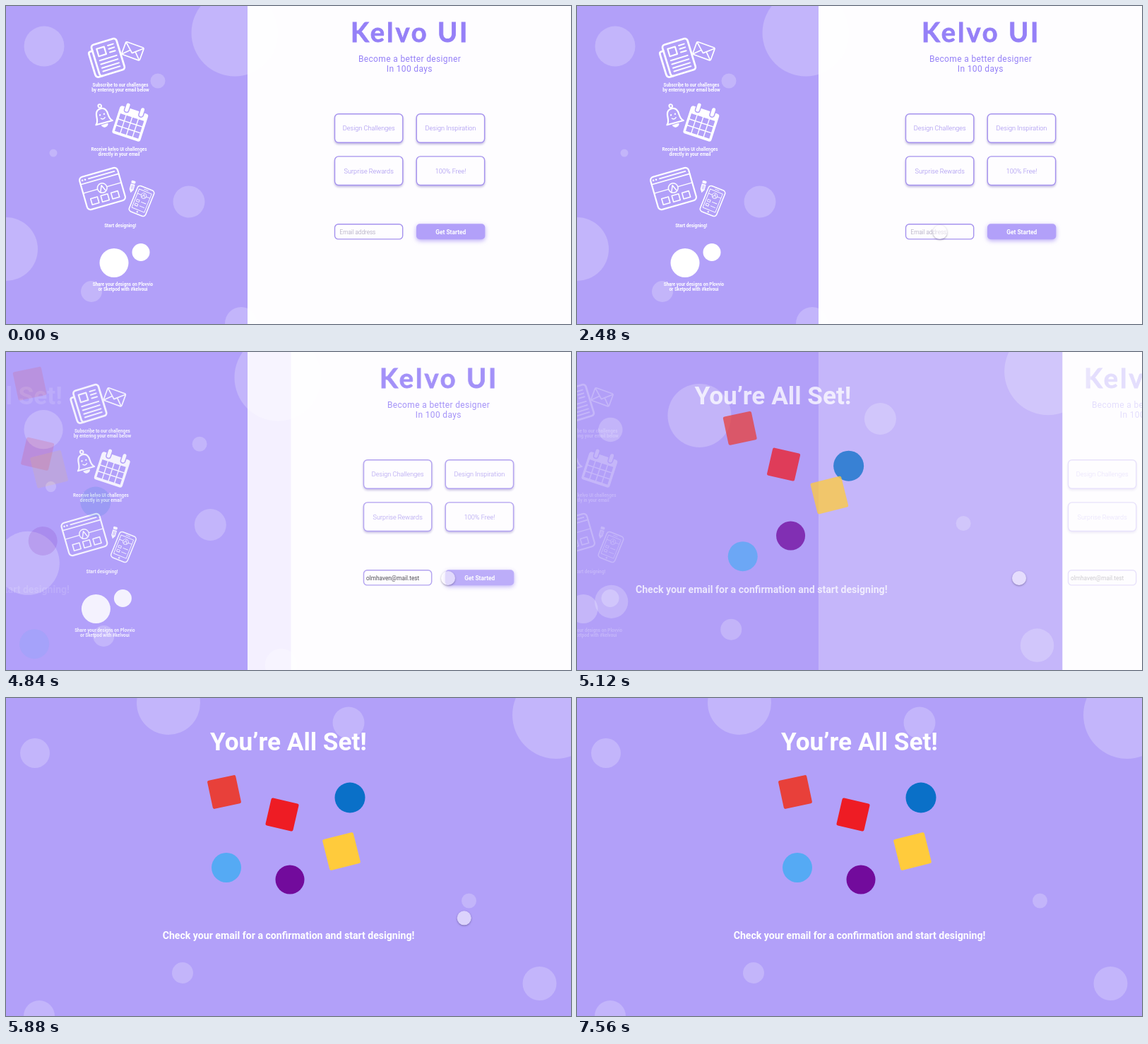
An HTML page that plays this animation: 800 px wide and 450 px high, repeating every 7.6 s.

```html
<!DOCTYPE html>
<html lang="en">
<head>
<meta charset="utf-8">
<title>Design challenge sign-up</title>
<style>
/* p: page change, a: cursor entry, h: cursor slide, b: cursor exit, n: typed letters */
@property --p { syntax: "<number>"; inherits: true; initial-value: 0; }
@property --a { syntax: "<number>"; inherits: true; initial-value: 0; }
@property --h { syntax: "<number>"; inherits: true; initial-value: 0; }
@property --b { syntax: "<number>"; inherits: true; initial-value: 0; }
@property --n { syntax: "<integer>"; inherits: true; initial-value: 0; }

html, body { margin: 0; width: 100%; height: 100%; overflow: hidden; background: #fefdff; }
.stage {
  position: relative; width: 800px; height: 450px; overflow: hidden;
  animation: loop 7.6s linear infinite;
}
@keyframes loop {
  0% { --p: 0; --a: 0; --h: 0; --b: 0; --n: 0; }
  7.37% { --a: 0; animation-timing-function: cubic-bezier(.455, .03, .515, .955); }
  23.68% { --a: 1; }
  33.3% { --n: 0; }
  42.6% { --n: 18; }
  43.16% { --h: 0; animation-timing-function: cubic-bezier(.455, .03, .515, .955); }
  51.58% { --h: 107; }
  54.6% { --h: 107; animation-timing-function: cubic-bezier(.455, .03, .515, .955); }
  59.2% { --h: 112; }
  61.29% { --p: 0; animation-timing-function: cubic-bezier(.455, .03, .515, .955); }
  70.74% { --p: 1; }
  73.1% { --b: 0; animation-timing-function: cubic-bezier(.455, .03, .515, .955); }
  88.45% { --b: 1; }
  100% { --p: 1; --a: 1; --h: 112; --b: 1; --n: 18; }
}

svg { display: block; font-family: Roboto, "Liberation Sans", sans-serif; }
.mid { text-anchor: middle; }
.purple { fill: #b2a0f9; }
.cover { width: calc(342px + 458px * var(--p)); opacity: var(--p); }
.leave { opacity: calc(1 - var(--p)); transform: translateX(calc(var(--dx) * var(--p))); }
.enter { opacity: var(--p); transform: translateX(calc(var(--dx) * (1 - var(--p)))); }
.bubble {
  fill: #fff; fill-opacity: .22;
  cx: calc(1px * (var(--x) + var(--dx) * var(--p)));
  cy: calc(1px * (var(--y) + var(--dy) * var(--p)));
  r: calc(1px * (var(--r) + var(--dr) * var(--p)));
}
.badge {
  opacity: var(--p);
  transform: translate(calc(1px * (var(--x) + var(--dx) * var(--p))),
                       calc(1px * (var(--y) + var(--dy) * var(--p))));
}

.title {
  font: 700 38px Lato, sans-serif; letter-spacing: 3px;
  fill: #9580f7; stroke: #9580f7; stroke-width: .8;
}
.lead { font-size: 12px; letter-spacing: .35px; fill: #9580f7; }
.box { fill: #fefdff; stroke: #a592ee; stroke-width: 1.4; }
.card .box { filter: drop-shadow(0 2px 1.5px rgba(90, 70, 170, .35)); }
.card text { font-size: 9.15px; font-weight: 300; fill: #9d88ee; }
.button { filter: drop-shadow(0 2px 3px rgba(140, 115, 240, .6)); }
.button + text { font-size: 8.4px; font-weight: 700; fill: #fff; }
.hint { font-size: 8.2px; font-weight: 300; fill: #9f97b2; fill-opacity: clamp(0, 1 - var(--n), 1); }
.typed { font-size: 8.25px; fill: #35323c; }
.typed tspan { fill-opacity: clamp(0, var(--n) - var(--i), 1); }

.steps { fill: #fff; }
.steps text { font-size: 6.3px; font-weight: 700; text-anchor: middle; }
.line { fill: none; stroke: #fff; stroke-linecap: round; stroke-linejoin: round; }
.done { font-weight: 700; fill: #fff; text-anchor: middle; }

.cursor {
  position: absolute; left: -10px; top: -10px; width: 20px; height: 20px; border-radius: 50%;
  background: rgba(255, 253, 255, .55);
  box-shadow: 0 1px 2.5px rgba(40, 30, 70, .42);
  transform: translate(
    calc(1px * (770 - 256 * var(--a) * var(--a) + var(--h)
      + 142 * var(--b) * (1 - var(--b)) + 134 * var(--b) * var(--b))),
    calc(1px * (408 * var(--a) * (1 - var(--a)) + 334 * var(--a) * var(--a) - 14
      - 334 * var(--b) * var(--b))));
}
</style>
</head>
<body>
<div class="stage">
<svg width="800" height="450" viewBox="0 0 800 450">
  <rect width="800" height="450" fill="#fefdff"/>
  <rect class="purple" width="342" height="450"/>

  <g class="leave" style="--dx:305px">
    <text class="title" x="488" y="51">Kelvo UI</text>
    <text class="lead mid" x="571.5" y="78.6">Become a better designer</text>
    <text class="lead mid" x="571.3" y="93.2">In 100 days</text>
    <g id="cards"></g>
    <rect class="box" x="465.5" y="308.7" width="96.2" height="21.2" rx="5"/>
    <text class="hint" x="472.5" y="322.8">Email address</text>
    <text class="typed" id="typed" x="469" y="322.8"></text>
    <rect class="purple button" x="581" y="308.3" width="97.3" height="22" rx="5"/>
    <text class="mid" x="629.8" y="322.9">Get Started</text>
  </g>

  <rect class="purple cover" height="450"/>
  <g id="bubbles"></g>

  <g class="steps leave" style="--dx:-191px">
    <!-- newspaper -->
    <g class="line" transform="translate(143 73) rotate(-17)" stroke-width="2.7">
      <rect x="-17" y="-23" width="37" height="46" rx="4"/>
      <path d="M-17 -15h-3q-3 0-3 3v30q0 5 5 5h5"/>
      <rect x="-10.5" y="-16" width="11" height="11" stroke-width="2.2"/>
      <path d="M6 -16h8M6 -11h8M6 -6h8M-11 1h25M-11 6.5h25M-11 12h25M-11 17h25" stroke-width="2"/>
    </g>
    <!-- envelope -->
    <g class="line" transform="translate(179.5 63.8) rotate(20)" stroke-width="1.7">
      <rect x="-13.5" y="-9.5" width="27" height="19" rx="2"/>
      <path d="M-13 -8.5L0 3L13 -8.5M-12.5 8.5L-4 0M12.5 8.5L4 0"/>
    </g>
    <text x="162" y="113.6">Subscribe to our challenges</text>
    <text x="162" y="121.2">by entering your email below</text>

    <!-- bell -->
    <g transform="translate(136.5 155.5) rotate(-15)">
      <path class="line" stroke-width="2.2" d="M-12 10C-7 6-9-1-7.5-5A7.8 7.8 0 0 1 7.5-5C9-1 7 6 12 10Z"/>
      <circle class="line" cy="-14.5" r="2.3" stroke-width="2"/>
      <path d="M-5 12h10a5 4.5 0 0 1-10 0z"/>
      <circle cx="-3" cy="-2" r="1.2"/><circle cx="3" cy="-2" r="1.2"/>
      <path class="line" d="M-3 3q3 3 6 0" stroke-width="1.4"/>
    </g>
    <!-- calendar -->
    <g transform="translate(176 166) rotate(18)">
      <rect x="-21" y="-20" width="42" height="41" rx="3.5"/>
      <g class="purple" id="days"></g>
      <g stroke="#b2a0f9" stroke-width="1.5">
        <rect x="-14" y="-27" width="6.5" height="14" rx="3.2"/>
        <rect x="7.5" y="-27" width="6.5" height="14" rx="3.2"/>
      </g>
    </g>
    <text x="160" y="204.6">Receive kelvo UI challenges</text>
    <text x="160" y="212.2">directly in your email</text>

    <!-- browser window -->
    <g transform="translate(136.5 258.5) rotate(-16)">
      <g class="line" stroke-width="2.2">
        <rect x="-28" y="-24" width="56" height="48" rx="5"/>
        <path d="M-28 -14h56M-15 -19h38" stroke-width="1.7"/>
        <path d="M-27 -1h20M7 -1h20" stroke-width="1.3"/>
        <circle cy="-1" r="6.8" stroke-width="1.5"/>
        <path d="M-3.5 3L0 -5L3.5 3" stroke-width="1.5"/>
        <path d="M-20 9h10v9h-10zM-5 9h10v9h-10zM10 9h10v9h-10z" stroke-width="1.6"/>
      </g>
      <circle cx="-24" cy="-19" r="1.3"/><circle cx="-20" cy="-19" r="1.3"/>
    </g>
    <!-- pencil -->
    <g transform="translate(178.8 255.5) rotate(15)">
      <rect x="-3" y="-8.5" width="6" height="4" rx="1.5"/>
      <path d="M-3 -3.5h6v8l-3 4.5l-3-4.5z"/>
      <path d="M-.8 -2v6M1 -2v6" stroke="#b2a0f9" stroke-width=".7"/>
    </g>
    <!-- phone -->
    <g class="line" transform="translate(192 276) rotate(22)" stroke-width="1.6">
      <rect x="-12.5" y="-19.5" width="25" height="39" rx="4"/>
      <g stroke-width=".9">
        <path d="M-9.5 -14.5h19v28h-19zM-3 -17h6"/>
        <circle cy="-8" r="3.8"/>
        <path d="M-2 -6L0 -10L2 -6M-9 -8h5M4 -8h5M-7 0h4v3h-4zM0 1.5h7M-7 6h4v3h-4zM0 7.5h7"/>
        <circle cy="16.5" r=".8"/>
      </g>
    </g>
    <text x="161.7" y="313.4">Start designing!</text>

    <circle cx="153" cy="363.5" r="20.5"/>
    <circle cx="191" cy="348.5" r="12.5"/>
    <text x="165.5" y="395.8">Share your designs on Plovvio</text>
    <text x="165.5" y="403.4">or Sketpod with #kelvoui</text>
  </g>

  <g class="enter" style="--dx:-498px">
    <text class="done" x="400" y="74" font-size="35.2">You’re All Set!</text>
  </g>
  <g id="badges"></g>
  <g class="enter" style="--dx:-564px">
    <text class="done" x="400" y="341.2" font-size="14.1">Check your email for a confirmation and start designing!</text>
  </g>
</svg>
<div class="cursor"></div>
</div>

<script>
const fill = (id, items, make) => {
  document.getElementById(id).innerHTML = items.map(make).join("");
};
const path = (x, y, x2, y2) => `--x:${x};--y:${y};--dx:${x2 - x};--dy:${y2 - y}`;

fill("cards", [
  ["Design Challenges", 465.5, 152.7], ["Design Inspiration", 581.3, 152.7],
  ["Surprise Rewards", 465.5, 212.9], ["100% Free!", 581.3, 212.9]
], ([label, x, y]) => `<g class="card">
  <rect class="box" x="${x}" y="${y}" width="96.3" height="40.6" rx="5.5"/>
  <text class="mid" x="${x + 48.2}" y="${y + 23.6}">${label}</text></g>`);

fill("typed", [..."olmhaven@mail.test"], (c, i) => `<tspan style="--i:${i}">${c}</tspan>`);

fill("days", [...Array(12).keys()], i =>
  `<rect x="${-17.6 + i % 4 * 9.1}" y="${-9 + Math.floor(i / 4) * 9.2}" width="7.7" height="7.7"/>`);

// start x, y, r, then end x, y, r
fill("bubbles", [
  [0, 344, 45, 230, 7, 45], [54, 57, 28.5, 47, 450, 22],
  [215, 106, 10.5, 655.5, 287, 10.5], [259, 277, 22.5, 485, 35, 22.5],
  [67, 208, 5.5, 41, 78, 21], [324, 38, 61.5, 779, 24, 62],
  [121, 404, 15, 250, 389, 15], [333, 449, 23, 755.5, 404, 24]
], ([x, y, r, x2, y2, r2]) =>
  `<circle class="bubble" style="${path(x, y, x2, y2)};--r:${r};--dr:${r2 - r}"/>`);

// start x, y, end x, y, colour, size, tilt (none for circles)
fill("badges", [
  [-9, 31, 309, 133, "#e8403a", 41, -12], [-9, 141, 391, 165, "#ee1c24", 40, 13],
  [71, 223, 487, 141, "#0a70c8", 43], [-3, 158, 475, 217, "#ffcb3c", 45, -14],
  [-2, 269, 402, 257, "#720b9c", 41], [-2, 440, 312, 240, "#55aaf4", 42]
], ([x, y, x2, y2, color, size, tilt]) => `<g class="badge" style="${path(x, y, x2, y2)}">
  <rect x="${-size / 2}" y="${-size / 2}" width="${size}" height="${size}" fill="${color}"
    rx="${tilt ? 2.5 : size / 2}" transform="rotate(${tilt || 0})"/></g>`);
</script>
</body>
</html>
```
